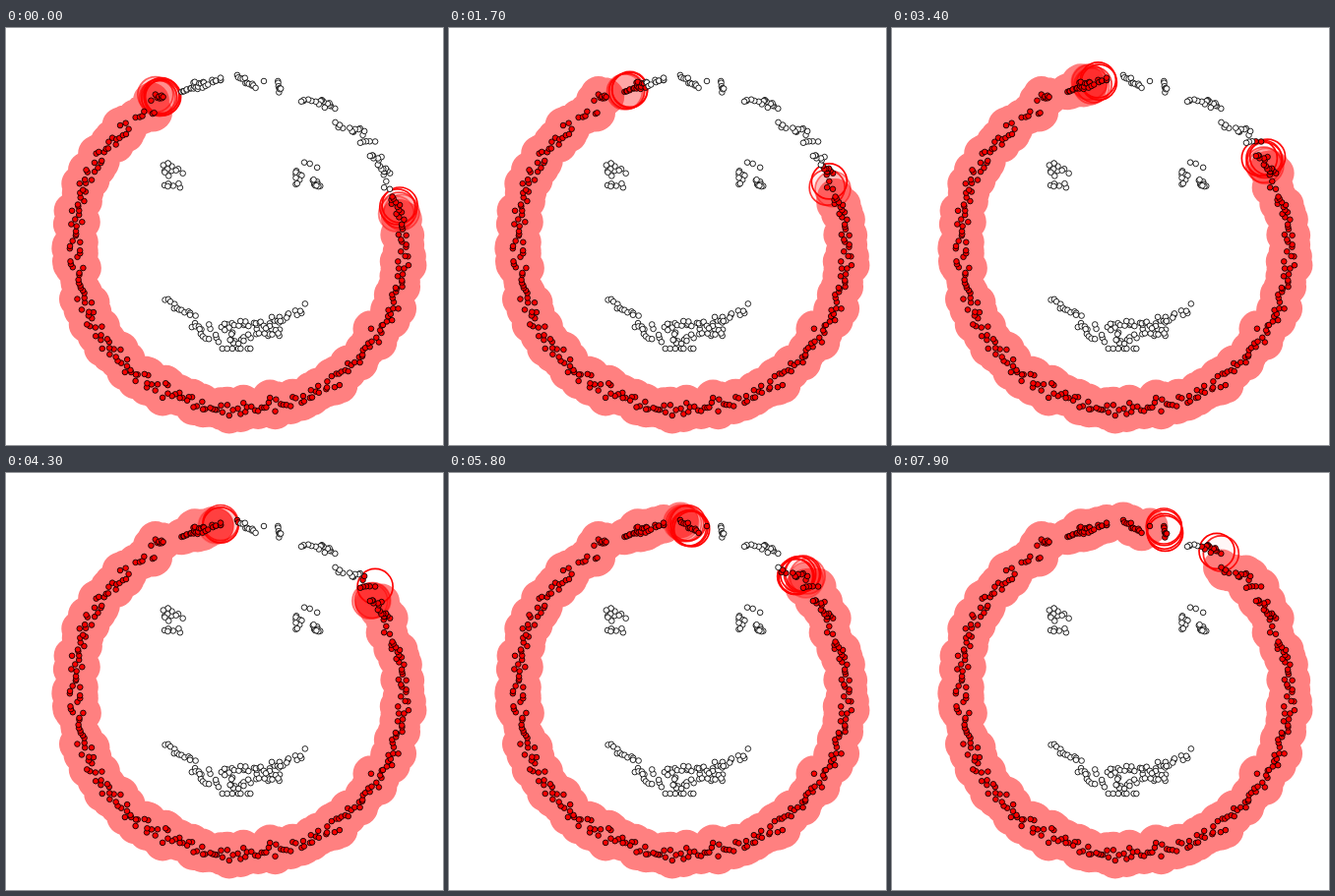
Animation of 444x424 px, one loop 8 s. Source, as an HTML page with a canvas:

```html
<!DOCTYPE html>
<html lang="en">
<head>
<meta charset="utf-8">
<title>Density clustering</title>
<style>
html, body { margin: 0; width: 100%; height: 100%; overflow: hidden; background: #fff; }
canvas { display: block; }
</style>
</head>
<body>
<canvas id="stage" width="444" height="424"></canvas>
<script>
const ctx = document.getElementById('stage').getContext('2d');
const EPS = 18, FADE = 0.8, TAU = Math.PI * 2;
const CX = 237, CY = 221, RADIUS = 167;

let seed = 11;
const rand = () => (seed = (seed * 16807) % 2147483647) / 2147483647;
const spread = s => s * (rand() * 2 - 1);

// n points along a line, each moved by up to s in x and y
const scatter = ([n, x0, y0, x1, y1, s]) => Array.from({ length: n }, (_, i) => {
  const u = (i + rand()) / n;
  return { x: x0 + (x1 - x0) * u + spread(s), y: y0 + (y1 - y0) * u + spread(s) };
});

// Lower part of the face outline; angles run clockwise from the top
const lower = Array.from({ length: 225 }, (_, i) => {
  const a = (80 + 238 * (i + rand()) / 225) * TAU / 360;
  const r = RADIUS + spread(4.5) + spread(4.5);
  return { x: CX + r * Math.sin(a), y: CY - r * Math.cos(a) };
});

// Clumps along the top, left to right
const upper = [
  [6, 130, 92, 151, 84, 3],
  [8, 151, 71, 161, 71, 4],
  [5, 178, 64, 187, 63, 2],
  [16, 187, 61, 205, 57, 5],
  [7, 208, 55, 220, 51, 2],
  [12, 234, 51, 252, 59, 4],
  [1, 262, 54, 262, 54, 0],
  [8, 274, 53, 279, 66, 3],
  [5, 298, 74, 311, 73, 2],
  [12, 317, 74, 334, 80, 4],
  [4, 333, 95, 345, 105, 2],
  [9, 351, 104, 362, 106, 4],
  [5, 358, 115, 377, 117, 2],
  [6, 369, 129, 381, 133, 2],
  [12, 379, 136, 388, 154, 4],
  [12, 387, 163, 402, 192, 4]
].flatMap(scatter);

const features = [
  // eyes
  [20, 168, 147, 168, 155, 12],
  [9, 296, 146, 297, 158, 4],
  [3, 303, 136, 318, 142, 1],
  [9, 312, 153, 319, 161, 4],
  // mouth
  [13, 160, 277, 193, 293, 3],
  [10, 192, 300, 205, 314, 4],
  [38, 216, 311, 252, 307, 12],
  [7, 217, 326, 251, 326, 0],
  [24, 261, 307, 280, 302, 9],
  [9, 280, 297, 305, 284, 4]
].flatMap(scatter);

// Two fronts climb the outline at a steady angular speed
const outline = [...lower, ...upper];
for (const p of outline) {
  const angle = Math.atan2(p.x - CX, CY - p.y) * 360 / TAU;
  p.visit = Math.min((angle + 26) / 5.1, (75 - angle) / 5.3);
}
outline.sort((a, b) => a.visit - b.visit);
// A point joins when the first point within reach is visited
for (const p of outline) {
  p.joined = outline.find(q => Math.hypot(p.x - q.x, p.y - q.y) <= EPS).visit;
}
for (const p of features) p.joined = Infinity;
const points = [...outline, ...features];

function disc(p, r) {
  ctx.moveTo(p.x + r, p.y);
  ctx.arc(p.x, p.y, r, 0, TAU);
}

function draw(t) {
  ctx.fillStyle = '#fff';
  ctx.fillRect(0, 0, 444, 424);

  ctx.beginPath();
  for (const p of outline) if (t - p.visit >= FADE) disc(p, 18.5);
  ctx.fillStyle = '#ff8080';
  ctx.fill();

  ctx.lineWidth = 1.7;
  for (const p of outline) {
    const age = (t - p.visit) / FADE;
    if (age < 0 || age >= 1) continue;
    ctx.beginPath();
    disc(p, EPS);
    ctx.fillStyle = `rgba(255,0,0,${0.4 * age ** 3})`;
    ctx.fill();
    ctx.strokeStyle = `rgba(255,0,0,${1 - 0.75 * age * age})`;
    ctx.stroke();
  }

  ctx.lineWidth = 0.85;
  ctx.strokeStyle = '#000';
  for (const p of points) {
    ctx.beginPath();
    disc(p, 2.8);
    ctx.fillStyle = t >= p.joined ? '#f00' : '#fff';
    ctx.fill();
    ctx.stroke();
  }
}

const start = performance.now();
function tick() {
  const ms = Math.max(0, performance.now() - start) % 8000;
  draw(Math.floor(ms / 100) / 10);
  requestAnimationFrame(tick);
}
tick();
</script>
</body>
</html>
```
